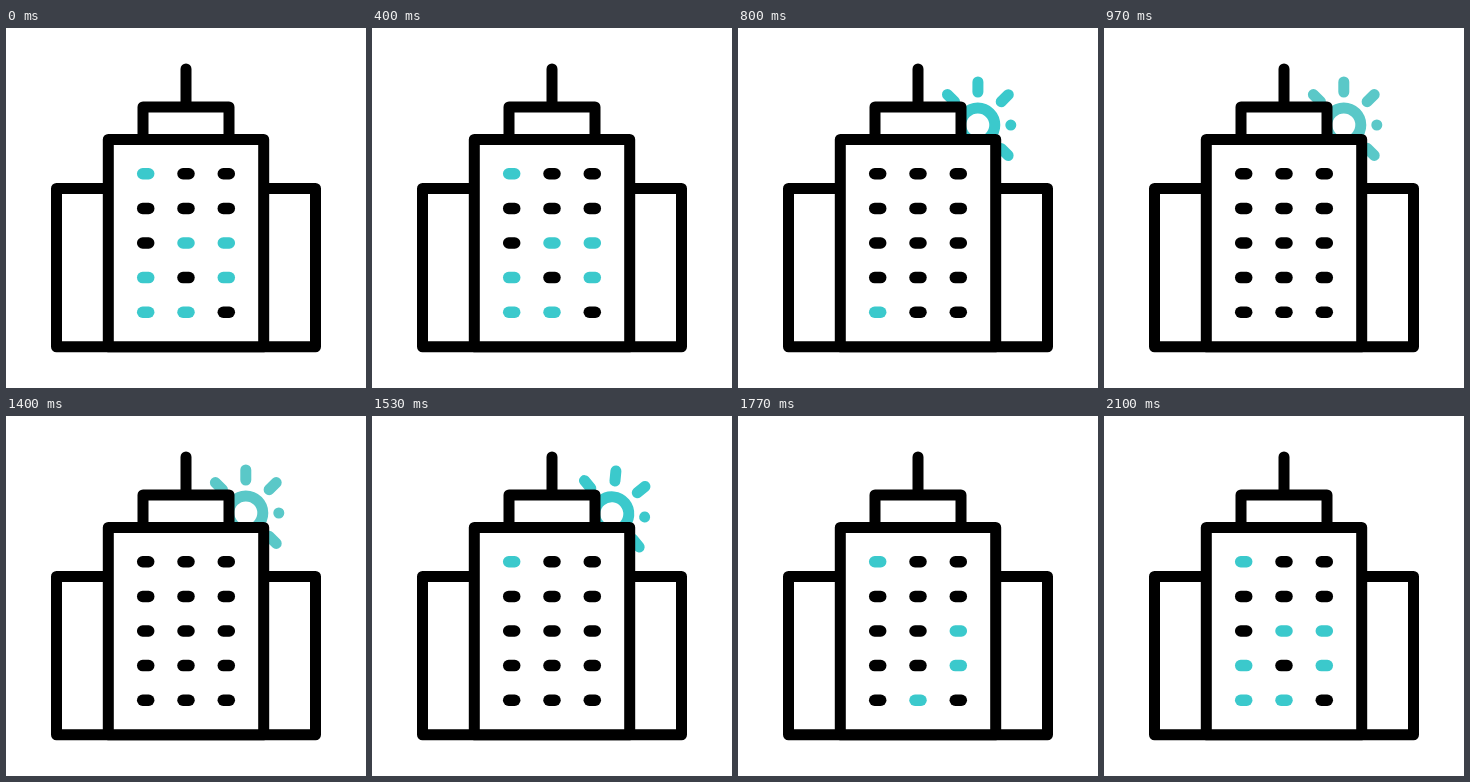
Recreate the animation shown at these times as an HTML page. Size 360 px wide and 360 px high, loop 2500 ms.

```html
<!DOCTYPE html>
<html lang="en">
<head>
<meta charset="utf-8">
<title>City sunrise</title>
<style>
  html, body { margin: 0; width: 100%; height: 100%; overflow: hidden; background: #fff; }
  svg { display: block; width: 100%; height: 100%; }
</style>
</head>
<body>
<svg viewBox="0 0 360 360" fill="none" stroke-width="11" stroke-linecap="round" stroke-linejoin="round">
  <g id="sun"><circle r="17"/></g>
  <g fill="#fff" stroke="#000">
    <path d="M180 41V79"/>
    <path d="M137 111V79H223V111"/>
    <path d="M50.5 160.5H309.5V318.8H50.5Z"/>
    <path d="M102.3 318.8V111.5H257.7V318.8Z"/>
  </g>
  <g id="windows" stroke-width="11.5"></g>
</svg>
<script>
const LOOP = 2500;
const TEAL = '#3bc9cc', PALE_TEAL = '#5ac8c8';
const sun = document.getElementById('sun');
const windowGroup = document.getElementById('windows');

function addPath(parent, d) {
  const path = document.createElementNS('http://www.w3.org/2000/svg', 'path');
  path.setAttribute('d', d);
  parent.append(path);
  return path;
}

// The ray pointing right is only a dot.
for (let i = 0; i < 8; i++) {
  addPath(sun, i ? 'M33 0H43' : 'M33 0h.01').setAttribute('transform', `rotate(${i * 45})`);
}

// Lit windows, keyed by row and column: [switch-off time, switch-on time]
const lights = {
  '00': [500, 1500], '21': [570, 1830], '22': [570, 1570], '30': [640, 1900],
  '32': [770, 1670], '40': [870, 1930], '41': [770, 1740]
};
const panes = [];
for (let row = 0; row < 5; row++) {
  for (let col = 0; col < 3; col++) {
    const path = addPath(windowGroup, `M${136.7 + col * 40.3} ${145.8 + row * 34.6}h6`);
    panes.push({ path, times: lights[`${row}${col}`] });
  }
}

function draw(t) {
  // Time away from the resting pose: rising until 830, setting from 1400.
  const away = Math.min(430, Math.max(0, 830 - t, t - 1400)) / 230;
  const y = 97 + 10 * away ** 4.5;
  const angle = 20 * away ** 2.3;
  sun.setAttribute('transform', `translate(239.8 ${y}) rotate(${angle})`);
  sun.setAttribute('stroke', t >= 970 && t < 1430 ? PALE_TEAL : TEAL);

  for (const { path, times } of panes) {
    const lit = times && (t < times[0] || t >= times[1]);
    path.setAttribute('stroke', lit ? TEAL : '#000');
  }
}

const start = performance.now();
function frame() {
  draw((performance.now() - start) % LOOP);
  requestAnimationFrame(frame);
}
frame();
</script>
</body>
</html>
```
